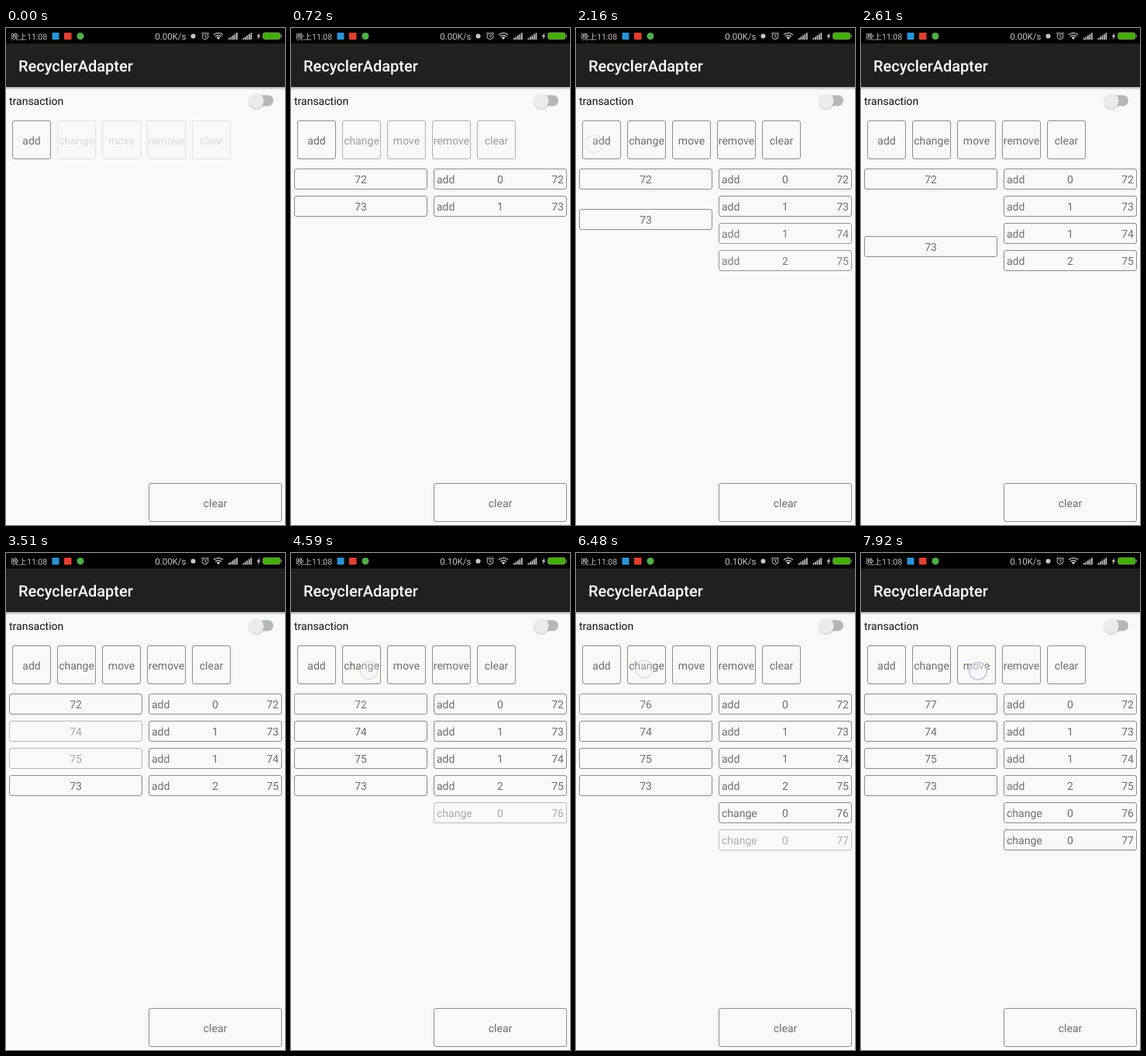
Write an HTML page that moves like this. It is 360 px wide and 640 px high and loops after 8000 ms.

```html
<!DOCTYPE html>
<html lang="en">
<head>
<meta charset="utf-8">
<title>RecyclerAdapter</title>
<style>
html, body { margin: 0; width: 100%; height: 100%; overflow: hidden; background: #f8faf7; }
svg { display: block; width: 360px; height: 640px; }
text { font-family: Roboto, "Noto Sans CJK SC", "Noto Sans CJK", sans-serif; font-size: 14px; fill: #6e6f6d; text-rendering: geometricPrecision; }
.mid { text-anchor: middle; }
.end { text-anchor: end; }
.box { fill: none; stroke: #8c8d8b; }
.status text { fill: #c4c4c4; }
.line { fill: none; stroke: #c8c8c8; }
</style>
</head>
<body>
<svg id="stage" viewBox="0 0 360 640">
  <defs>
    <linearGradient id="shade" x2="0" y2="1">
      <stop offset="0" stop-opacity=".28"/>
      <stop offset="1" stop-opacity="0"/>
    </linearGradient>
  </defs>
  <rect width="360" height="640" fill="#f8faf7"/>
  <rect y="76" width="360" height="4" fill="url(#shade)"/>
  <rect y="20" width="360" height="56" fill="#20211f"/>
  <rect width="360" height="20"/>
  <g class="status" id="status">
    <text x="6" y="14.5" style="font-size:10.5px">晚上11:08</text>
    <rect x="59.5" y="6" width="9" height="9" rx="1" fill="#2a93d5"/>
    <rect x="75" y="6" width="9.5" height="9" rx="1" fill="#e2402f"/>
    <circle cx="96" cy="10.5" r="4.5" fill="#4fb04b"/>
    <text id="speed" class="end" x="232.5" y="14.5" style="font-size:11.5px"></text>
    <circle cx="241.5" cy="10.5" r="3" fill="#c8c8c8"/>
    <g class="line">
      <circle cx="257" cy="10.5" r="4"/>
      <path d="M257 8v3l2 1M252 7.5l2.5-2.2M262 7.5l-2.5-2.2"/>
      <path d="M268 8.8q6-5 12 0M270 11q4-3.4 8 0" stroke-width="1.3"/>
    </g>
    <path d="M271.6 12.2q2.4-1.8 4.8 0L274 15z" fill="#c8c8c8"/>
    <path d="M327.5 6l-4 5h2.2l-1.2 4 4-5.3h-2.2z" fill="#c8c8c8"/>
    <rect x="331.5" y="6" width="22.5" height="8.5" rx="2.5" fill="#43ae04" stroke="#7f9a72" stroke-width=".8"/>
    <path d="M355.3 8.5v3.5" stroke="#7f9a72"/>
  </g>
  <text x="16" y="56" style="font-size:20px;font-weight:500;fill:#fff">RecyclerAdapter</text>
  <text x="4" y="99" style="fill:#111">transaction</text>
  <rect x="316" y="86.5" width="29" height="14" rx="7" fill="#b6b7b5"/>
  <circle cx="323" cy="95" r="10.3" fill="#000" opacity=".14"/>
  <circle cx="323" cy="94" r="9.8" fill="#ebecea"/>
</svg>
<script>
const NS = "http://www.w3.org/2000/svg";
const stage = document.getElementById("stage");
const speed = document.getElementById("speed");
const LOOP = 8000, FADE = 560, SLOW = 1340;

function add(parent, tag, attrs, text) {
  const el = document.createElementNS(NS, tag);
  for (const k in attrs) el.setAttribute(k, attrs[k]);
  if (text !== undefined) el.textContent = text;
  parent.appendChild(el);
  return el;
}

function box(x, y, w, h, label) {
  const g = add(stage, "g", {});
  add(g, "rect", { x: x + .5, y: y + .5, width: w - 1, height: h - 1, rx: 2.5, class: "box" });
  if (label) add(g, "text", { x: x + w / 2, y: y + h / 2 + 5.5, class: "mid" }, label);
  return g;
}

const rowY = i => 181 + 35 * i;
const item = (i, label) => box(4, rowY(i), 172, 27, label);

function logRow(i, [name, pos, value]) {
  const g = box(184, rowY(i), 172, 27);
  const y = rowY(i) + 19;
  add(g, "text", { x: 188, y }, name);
  add(g, "text", { x: 270, y, class: "mid" }, pos);
  add(g, "text", { x: 352, y, class: "end" }, value);
  return g;
}

// signal bars
for (const x of [287, 305.5])
  for (let i = 0; i < 5; i++)
    add(document.getElementById("status"), "rect",
      { x: x + i * 2.5, y: 13 - i * 1.7, width: 1.7, height: 2 + i * 1.7, fill: "#c8c8c8" });

const buttons = ["add", "change", "move", "remove", "clear"].map((s, i) => box(8 + 58 * i, 119, 50, 50, s));
box(184, 586, 172, 50, "clear");

// click times
const FIRST = 30, SECOND = 1722, THIRD = 4290, FOURTH = 6190, INSERT = 3200;

const logs = [
  ["add", 0, 72, FIRST], ["add", 1, 73, FIRST],
  ["add", 1, 74, SECOND], ["add", 2, 75, SECOND],
  ["change", 0, 76, THIRD], ["change", 0, 77, FOURTH]
].map((r, i) => ({ el: logRow(i, r), start: r[3] }));

const heads = [
  { el: item(0, 72), start: FIRST, len: FADE, out: THIRD },
  { el: item(0, 76), start: THIRD, len: SLOW, out: FOURTH },
  { el: item(0, 77), start: FOURTH, len: SLOW, out: Infinity }
];
const moved = item(1, 73);
const inserted = [item(1, 74), item(2, 75)];

const touches = [
  [23.5, 149, 1440, SECOND], [100.5, 151, 3960, THIRD],
  [88, 149.5, 5760, FOURTH], [151, 152, 7560, LOOP]
].map(([cx, cy, down, up]) => ({
  down, up,
  el: add(stage, "circle", { cx, cy, r: 11.3, fill: "#f6f6fc", "fill-opacity": .5, stroke: "#c3c7e2", "stroke-width": 1.5 })
}));

const clamp = v => Math.max(0, Math.min(1, v));
const ease = (t, start, len) => .5 - .5 * Math.cos(Math.PI * clamp((t - start) / len));
const alpha = (el, v) => el.setAttribute("opacity", v.toFixed(3));

function draw(t) {
  speed.textContent = t < 4320 ? "0.00K/s" : "0.10K/s";
  buttons.forEach((b, i) => alpha(b, i ? .22 + .78 * ease(t, 0, SLOW) : 1));
  logs.forEach(r => alpha(r.el, ease(t, r.start, FADE)));
  heads.forEach(h => alpha(h.el, ease(t, h.start, h.len) * (1 - ease(t, h.out, SLOW))));
  alpha(moved, ease(t, FIRST, FADE));
  moved.setAttribute("transform", `translate(0 ${Math.round(70 * ease(t, SECOND, SLOW))})`);
  inserted.forEach(el => alpha(el, ease(t, INSERT, FADE)));
  touches.forEach(p => alpha(p.el, t < p.down ? 0 : 1 - clamp((t - p.up) / 650)));
}

function tick(now) {
  draw(now % LOOP);
  requestAnimationFrame(tick);
}
draw(0);
requestAnimationFrame(tick);
</script>
</body>
</html>
```
